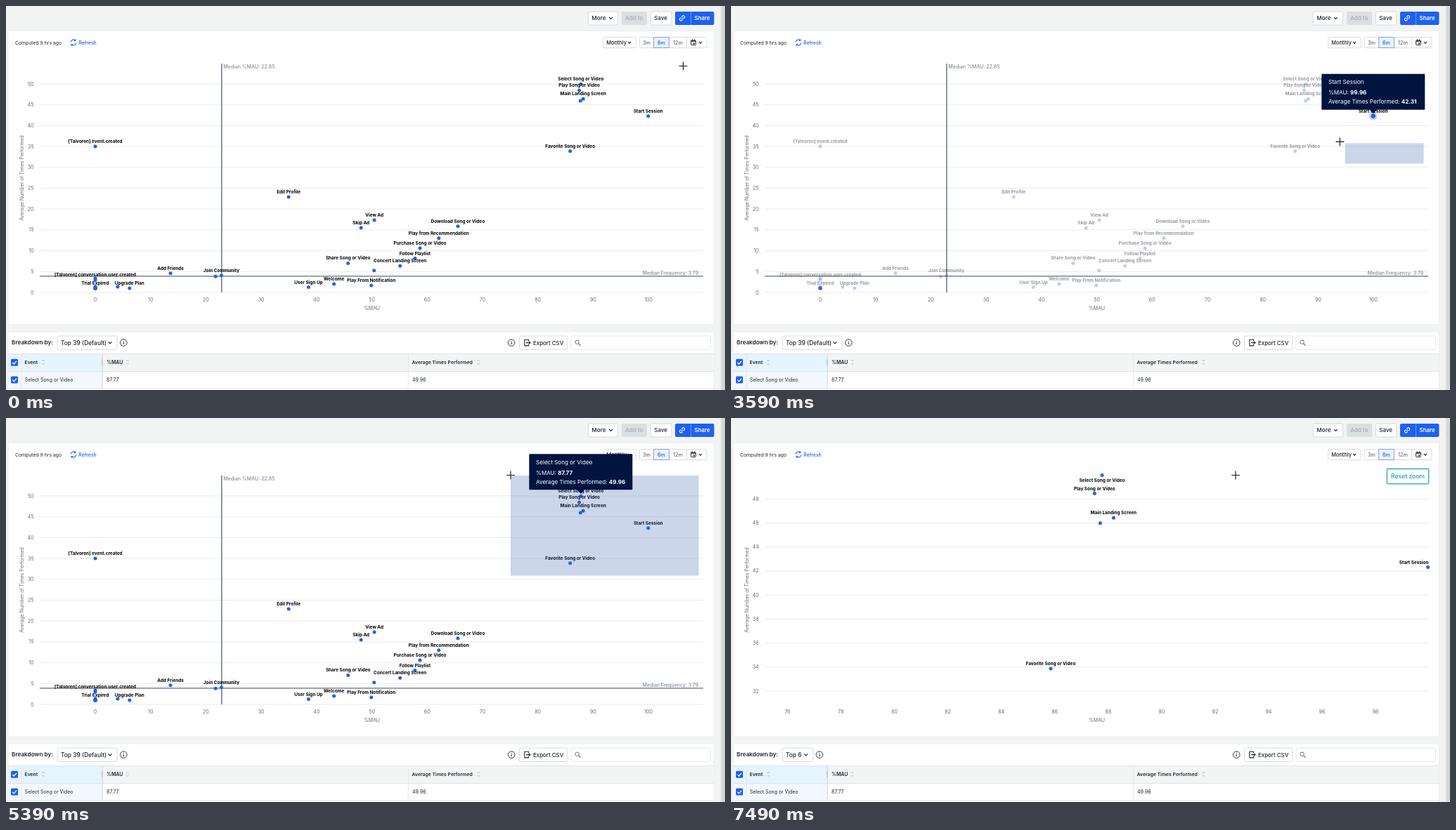
An HTML page that plays this animation: 1023 px wide and 547 px high, repeating every 8 s.

```html
<!DOCTYPE html>
<html lang="en">
<head>
<meta charset="utf-8">
<title>Engagement matrix</title>
<style>
  html, body { margin: 0; width: 100%; height: 100%; overflow: hidden; background: #f2f4f4; }
  svg { display: block; width: 1023px; height: 547px; font-family: Inter, "Open Sans", sans-serif; }
  text { white-space: pre; }
</style>
</head>
<body>
<svg id="stage" viewBox="0 0 1023 547">
  <g id="page"></g>
  <g id="chart"></g>
  <g id="controls"></g>
  <g id="overlay"></g>
</svg>
<script>
const LOOP = 8000;
const INK = '#21252c', GREY = '#666b72', BLUE = '#1e61f0', BORDER = '#cfd3d8';
const PLOT = { left: 48, right: 992, top: 82, bottom: 408 };
const DRAG_START = 2690, LEAVE = 5000, ZOOM_START = 5550, ZOOM_TIME = 350;

// name, %MAU, average times performed, label hidden
const points = [
  ['Select Song or Video', 87.77, 49.96],
  ['Play Song or Video', 87.49, 48.44],
  ['Main Landing Screen', 88.2, 46.42],
  ['Search Song or Video', 87.7, 45.97, true],
  ['Start Session', 99.96, 42.31],
  ['Favorite Song or Video', 85.85, 33.87],
  ['[Talvoren] event.created', 0, 35],
  ['Edit Profile', 34.95, 22.9],
  ['View Ad', 50.45, 17.35],
  ['Skip Ad', 48.05, 15.5],
  ['Download Song or Video', 65.55, 15.85],
  ['Play from Recommendation', 62.1, 13],
  ['Purchase Song or Video', 58.7, 10.6],
  ['Follow Playlist', 57.8, 8.15],
  ['Concert Landing Screen', 55.1, 6.35],
  ['Share Song or Video', 45.7, 7],
  ['', 50.4, 5.25],
  ['Add Friends', 13.6, 4.6],
  ['Join Community', 22.8, 4.1],
  ['', 21.75, 3.85],
  ['[Talvoren] conversation.user.created', 0, 3],
  ['', 0, 3.4],
  ['Trial Expired', 0, 1],
  ['', 0, 1.4],
  ['', 4.05, 1.35],
  ['Upgrade Plan', 6.2, 1],
  ['User Sign Up', 38.55, 1.25],
  ['Welcome', 43.15, 2],
  ['Play From Notification', 49.9, 1.7],
  ...Array.from({ length: 8 }, () => ['', 0, 1])
].map(([name, mau, avg, hidden]) => ({ name, mau, avg, label: hidden ? '' : name }));
const [select, , , search, start, favorite] = points;

const hovers = [[500, start], [3700, favorite], [4050, search], [4650, select]];
const cursorPath = [[300, 963.5, 85.5], [2300, 985.5, 225.5], [DRAG_START, 985.5, 225.5],
  [3590, 866.5, 193.5], [4290, 773.5, 137], [4850, 718, 81.5]];

const $ = id => document.getElementById(id);
const clamp = v => Math.max(0, Math.min(1, v));
const lerp = (a, b, k) => a + (b - a) * k;
const smooth = k => k * k * (3 - 2 * k);
const range = (from, to, step) => Array.from({ length: (to - from) / step + 1 }, (_, i) => from + i * step);

const text = (x, y, s, size, fill = INK, weight = 400, anchor = 'start', extra = '') =>
  `<text x="${x}" y="${y}" font-size="${size}" fill="${fill}" font-weight="${weight}" text-anchor="${anchor}" ${extra}>${s}</text>`;
const rect = (x, y, w, h, fill, stroke = 'none', r = 0, sw = 0.8) =>
  `<rect x="${x}" y="${y}" width="${w}" height="${h}" rx="${r}" fill="${fill}" stroke="${stroke}" stroke-width="${sw}"/>`;
const path = (d, stroke = INK, sw = 1, extra = '') =>
  `<path d="${d}" fill="none" stroke="${stroke}" stroke-width="${sw}" ${extra}/>`;
const circle = (x, y, r, fill, extra = '') => `<circle cx="${x}" cy="${y}" r="${r}" fill="${fill}" ${extra}/>`;
const chevron = (x, y, s = 2.4) => path(`M${x - s} ${y - s / 2}l${s} ${s}l${s} ${-s}`, INK, 1.2);
const info = (x, y) => circle(x, y, 4.8, 'none', `stroke="${INK}" stroke-width=".9"`) +
  path(`M${x} ${y - 0.7}v3.2M${x} ${y - 2.6}v1.1`, INK, 1.1);
const sorter = (x, y) => path(`M${x - 1.6} ${y - 1.4}l1.6 -1.7l1.6 1.7M${x - 1.6} ${y + 1.4}l1.6 1.7l1.6 -1.7`, '#9aa1aa', 0.8);
const checkbox = (x, y) => rect(x, y, 10, 10, BLUE, 'none', 1.5) +
  path(`M${x + 2.3} ${y + 5.2}l2 2l3.6 -4.2`, '#fff', 1.3);

function pageMarkup() {
  return rect(1017.5, 0, 5.5, 547, '#d3d6d9') + rect(1016.5, 0, 1, 547, '#e6e9ea') +
    rect(3, 35.5, 1004.5, 418.5, '#fff', '#e6e9ea', 1) +
    rect(3, 464, 1004.5, 90, '#fff', '#e6e9ea', 1) +
    text(13, 54.6, 'Computed 9 hrs ago', 6.85, INK) +
    path('M92.2 51.5a3.7 3.7 0 0 1 6.4 -2.4M99.6 52.5a3.7 3.7 0 0 1 -6.4 2.4', BLUE, 1.1) +
    path('M96.6 49.6h2.3v-2.4M95.2 54.4h-2.3v2.4', BLUE, 1) +
    text(103.3, 54.6, 'Refresh', 6.9, BLUE, 500) +
    text(0, 0, 'Average Number of Times Performed', 6.9, GREY, 400, 'middle', 'transform="translate(24.8 245) rotate(-90)"') +
    text(520.5, 433, '%MAU', 7, GREY, 400, 'middle');
}

function controlsMarkup() {
  const header = rect(828.4, 8, 42, 19, '#fff', BORDER, 2) + text(833.3, 20.4, 'More', 8.2, INK, 500) + chevron(860.5, 17.3) +
    rect(876, 8, 36, 19, '#dcdfe2', 'none', 2) + text(881, 20.4, 'Add to', 8.1, '#a6abb2', 500) +
    rect(917.4, 8, 29.5, 19, '#fff', BORDER, 2) + text(922.3, 20.4, 'Save', 8, INK, 500) +
    rect(952, 8, 55.5, 19, BLUE, 'none', 2) + path('M974.5 8v19', '#7ba4f8', 0.8) +
    `<g transform="rotate(-45 962 17.4)">${path('M961.2 15.5h-1.6a1.9 1.9 0 0 0 0 3.8h1.6M962.8 15.5h1.6a1.9 1.9 0 0 1 0 3.8h-1.6M960.4 17.4h3.2', '#fff', 1.1)}</g>` +
    text(979.6, 20.4, 'Share', 7.9, '#fff', 600);
  const period = rect(849.6, 44.6, 46.6, 15, '#fff', BORDER, 2) + text(854.2, 54.7, 'Monthly', 7.4, INK, 500) + chevron(887, 52.2, 2) +
    rect(901.4, 44.6, 95.6, 15, '#fff', BORDER, 2) + path('M968.6 44.6v15', BORDER, 0.8) +
    rect(921.7, 44.6, 21.6, 15, '#eaf2fe', '#6f8fbd') +
    text(911.5, 54.7, '3m', 7.3, '#4c525b', 400, 'middle') + text(932.5, 54.7, '6m', 7.3, BLUE, 500, 'middle') +
    text(956, 54.7, '12m', 7.3, '#4c525b', 400, 'middle') +
    rect(974.6, 49, 6.8, 6.6, 'none', INK, 0.8, 1) + path('M974.6 50.2h6.8M976.4 47.6v1.6M979.6 47.6v1.6', INK, 1.2) +
    rect(978, 52.4, 2, 2, INK) + chevron(988, 52.2, 2);
  const tools = text(8, 482.3, 'Breakdown by:', 8.2, INK, 600) + info(719.2, 479.6) +
    rect(730.4, 470, 68.4, 19.4, '#fff', BORDER, 2) +
    path('M743.4 477.2v-1.9h-5.6v8.6h5.6v-1.9M740 479.6h5.8M744 477.6l2 2l-2 2', INK, 1.1) +
    text(750, 482.6, 'Export CSV', 7.9, INK, 500) +
    rect(804, 470, 198.4, 19.4, '#fff', '#dfe2e5', 2) +
    circle(812.6, 478.8, 2.7, 'none', `stroke="${GREY}" stroke-width="1"`) + path('M814.6 480.8l3 3', GREY, 1.2);
  const table = rect(3, 495.5, 1004.5, 25, '#f3f5f5') + rect(3, 495.5, 134, 25, '#e6f4fe') +
    rect(3, 521, 134, 24, '#f2f8fe') +
    path('M3 495.5h1004.5M3 520.6h1004.5M3 545h1004.5', '#dde1e4', 0.9) +
    path('M22 496v49M572.4 496v49', '#dfe3e6', 0.8) + path('M137.2 496v49', '#cbd1d7', 0.9) + path('M136.8 503.5v8', '#a9b1ba', 0.9) +
    checkbox(7, 502.8) + checkbox(7, 527.6) +
    text(26.6, 510, 'Event', 6.8, INK, 600) + sorter(53, 507.4) +
    text(143, 510, '%MAU', 6.9, INK, 600) + sorter(172.8, 507.4) +
    text(577.5, 510, 'Average Times Performed', 6.85, INK, 600) + sorter(672.3, 507.4) +
    text(26.8, 534.8, 'Select Song or Video', 6.9) + text(143, 534.8, '87.77', 7.1) + text(578, 534.8, '49.96', 7.1);
  return header + period + tools + table;
}

function axes(zoom) {
  const x0 = lerp(-10.04, 75.15, zoom), x1 = lerp(109.9, 99.97, zoom);
  const y0 = lerp(0, 30.9, zoom), y1 = lerp(54.88, 49.93, zoom);
  return {
    x: v => lerp(PLOT.left, PLOT.right, (v - x0) / (x1 - x0)),
    y: v => lerp(PLOT.bottom, PLOT.top, (v - y0) / (y1 - y0))
  };
}

function cursorAt(t) {
  const i = cursorPath.findIndex(k => k[0] > t);
  if (i < 0) return cursorPath.at(-1).slice(1);
  if (i === 0) return cursorPath[0].slice(1);
  const a = cursorPath[i - 1], b = cursorPath[i], k = (t - a[0]) / (b[0] - a[0]);
  const e = i === 1 ? smooth(k) : k;
  return [lerp(a[1], b[1], e), lerp(a[2], b[2], e)];
}

// How strongly a point is highlighted, fading out after the hover moves on.
function hoverLevel(point, t) {
  const i = hovers.findIndex(h => h[1] === point);
  if (i < 0 || t < hovers[i][0]) return 0;
  const end = i + 1 < hovers.length ? hovers[i + 1][0] : LEAVE;
  return 1 - clamp((t - end) / 350);
}

function chartMarkup(t, zoom) {
  const { x, y } = axes(zoom), zoomed = zoom > 0;
  const inX = px => px > PLOT.left - 1 && px < PLOT.right + 1;
  const inY = py => py > PLOT.top - 2 && py < PLOT.bottom + 1;
  let out = '';
  for (const v of zoomed ? range(32, 48, 2) : range(0, 50, 5)) {
    const py = y(v);
    if (inY(py)) out += path(`M${PLOT.left} ${py}H${PLOT.right}`, '#e6e6e6', 0.8) + text(39.6, py + 2.6, v, 7.1, GREY, 400, 'end');
  }
  for (const v of zoomed ? range(76, 98, 2) : range(0, 100, 10))
    if (inX(x(v))) out += text(x(v), 420.7, v, 7.1, GREY, 400, 'middle');
  if (!zoomed) {
    out += path('M306.8 82V408', '#5d6c84', 1.4) + path('M48 384.9H992', '#5d6c84', 1.1) +
      text(309.2, 89, 'Median %MAU: 22.85', 7, '#858d9b', 500) +
      text(985, 382.8, 'Median Frequency: 3.79', 6.9, '#858d9b', 500, 'end');
  }
  const dim = clamp((t - hovers[0][0]) / 100) - clamp((t - LEAVE) / 100);
  let dots = '', labels = '';
  for (const p of points) {
    const px = x(p.mau), py = y(p.avg), level = hoverLevel(p, t);
    if (!inX(px) || !inY(py)) continue;
    const faded = dim * (1 - level);
    if (level) dots += circle(px, py, 6, BLUE, `opacity="${0.25 * level}"`);
    dots += circle(px, py, 2.5 + 0.7 * level, BLUE, `opacity="${1 - 0.7 * faded}"`);
    const atEdge = px + 22 > PLOT.right;
    labels += text(atEdge ? PLOT.right + 0.5 : px, py + (py < 90 ? 9.9 : -5), p.label, 6.4, '#000', 700,
      atEdge ? 'end' : 'middle', `opacity="${1 - 0.6 * faded}"`);
  }
  return out + dots + labels;
}

function breakdownMarkup(zoomed) {
  const width = zoomed ? 43.6 : 85;
  return rect(73.2, 470, width, 19.4, '#fff', BORDER, 2) +
    text(78, 482.5, zoomed ? 'Top 6' : 'Top 39 (Default)', 8.4, INK, 500) +
    chevron(63 + width, 479.6) + info(82.3 + width, 479.6);
}

function tooltipMarkup(t) {
  const i = hovers.findLastIndex(h => t >= h[0]);
  if (i < 0 || t >= LEAVE + 500) return '';
  const { x, y } = axes(0), point = hovers[i][1], from = hovers[Math.max(0, i - 1)][1];
  const k = smooth(clamp((t - hovers[i][0]) / 200));
  const px = lerp(x(from.mau), x(point.mau), k), py = lerp(y(from.avg), y(point.avg), k);
  const left = px - 73.5, top = py - 60, tx = left + 9.7;
  const bold = v => `<tspan font-weight="700">${v}</tspan>`;
  return rect(left, top, 147, 51, '#001440', 'none', 1) +
    `<path d="M${px - 5.5} ${top + 50.5}h11l-5.5 6z" fill="#001440"/>` +
    text(tx, top + 14.7, point.name, 8.1, '#fff') +
    text(tx, top + 29.8, `%MAU: ${bold(point.mau)}`, 8.05, '#fff') +
    text(tx, top + 42.8, `Average Times Performed: ${bold(point.avg)}`, 8.05, '#fff');
}

function overlayMarkup(t) {
  const zoomed = t >= ZOOM_START;
  let out = breakdownMarkup(zoomed);
  if (t > DRAG_START && !zoomed) {
    const [sx, sy] = cursorAt(t - 55), top = Math.max(PLOT.top, sy);
    out += rect(sx, top, 985.6 - sx, Math.max(0, 224.6 - top), 'rgba(51,92,173,.25)');
  }
  out += tooltipMarkup(t);
  if (zoomed) out += rect(933.4, 72.4, 59.2, 21.4, '#fff', '#43b5ae', 1.5, 1.6) + text(963, 86, 'Reset zoom', 8.5, '#35aaa3', 600, 'middle');
  const [cx, cy] = cursorAt(t), plus = `M${cx - 6} ${cy}h12M${cx} ${cy - 6}v12`;
  return out + path(plus, '#fff', 2.4, 'opacity=".6"') + path(plus, '#1b1b1b', 1.2);
}

function draw(t) {
  const zoom = smooth(clamp((t - ZOOM_START) / ZOOM_TIME));
  $('chart').innerHTML = chartMarkup(t, zoom);
  $('overlay').innerHTML = overlayMarkup(t);
}

$('page').innerHTML = pageMarkup();
$('controls').innerHTML = controlsMarkup();
const began = performance.now();
function tick() {
  draw((performance.now() - began) % LOOP);
  requestAnimationFrame(tick);
}
tick();
</script>
</body>
</html>
```
